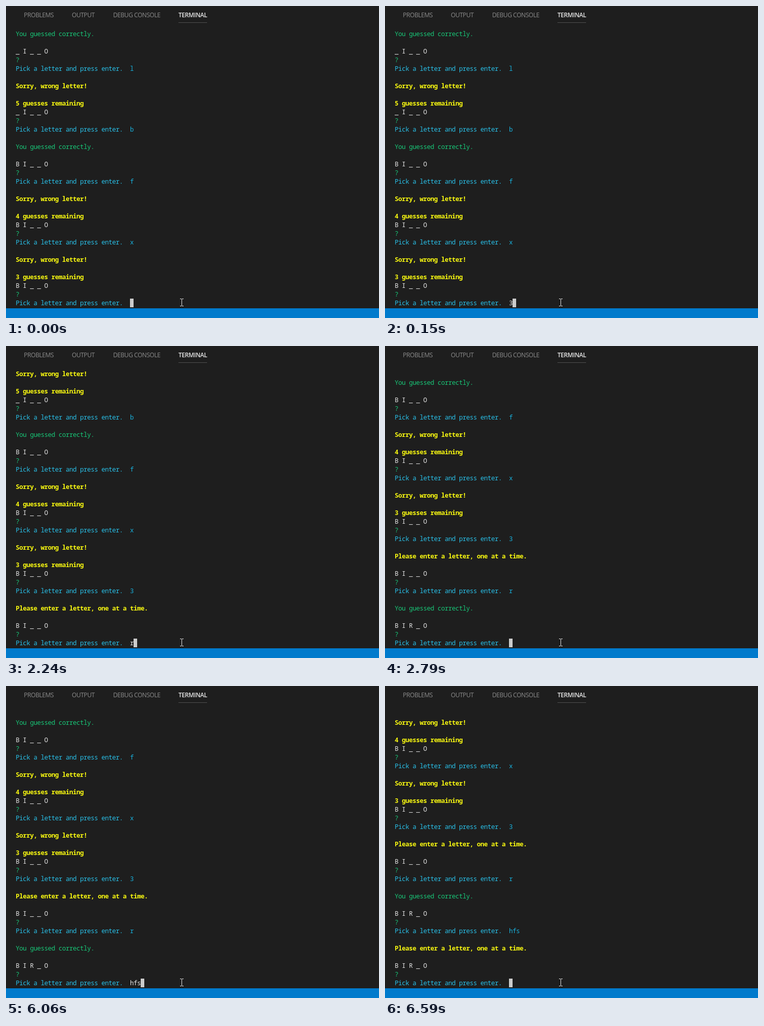
Animation of 731x611 px, one loop 8 s. Source, as an HTML page with a canvas:

```html
<!DOCTYPE html>
<html lang="en">
<head>
<meta charset="utf-8">
<title>Word game in a terminal</title>
<style>
  html, body { margin: 0; width: 100%; height: 100%; overflow: hidden; background: #1e1e1e; }
  canvas { display: block; }
</style>
</head>
<body>
<canvas id="stage" width="731" height="611"></canvas>
<script>
const ctx = document.getElementById('stage').getContext('2d');
const LOOP = 8000, ROWS = 32, ROW_H = 17, CELL = 7, LEFT = 19, TOP = 46;
const MONO = '12.5px "Noto Sans Mono", "DejaVu Sans Mono", monospace';
const SANS = '12px "Open Sans", "Noto Sans", sans-serif';
const GREEN = '#18c878', YELLOW = '#f8f810', CYAN = '#29c0e8', ANSWER = '#18b0dc', WHITE = '#e5e5e5';
const PROMPT = 'Pick a letter and press enter.  ';

// Each round: the message above the word, the word, and the answer given.
const right = 'You guessed correctly.';
const invalid = 'Please enter a letter, one at a time.';
const rounds = [
  [right, '_ I _ _ O', 'l'],
  [5, '_ I _ _ O', 'b'],
  [right, 'B I _ _ O', 'f'],
  [4, 'B I _ _ O', 'x'],
  [3, 'B I _ _ O', '3'],
  [invalid, 'B I _ _ O', 'r'],
  [right, 'B I R _ O', 'hfs'],
  [invalid, 'B I R _ O', '']
];

const FIRST_OPEN = 4;
const enterTimes = [530, 2790, 6590];
const keyTimes = [[150], [2240], [4350, 4920, 6060], []];

function stateAt(t) {
  const done = enterTimes.filter(e => t >= e).length;
  const typed = keyTimes[done].filter(k => t >= k).length;
  return { open: FIRST_OPEN + done, typed };
}

function transcript(open, typed) {
  const lines = [];
  const add = (text, color, answer = '', answerColor = ANSWER) =>
    lines.push({ text, color, answer, answerColor });
  rounds.slice(0, open + 1).forEach(([message, word, answer], i) => {
    if (i) add('');
    if (typeof message === 'number') {
      add('Sorry, wrong letter!', YELLOW);
      add('');
      add(message + ' guesses remaining', YELLOW);
    } else {
      add(message, message === right ? GREEN : YELLOW);
      add('');
    }
    add(word, WHITE);
    add('?', GREEN);
    if (i < open) add(PROMPT, CYAN, answer);
    else add(PROMPT, CYAN, answer.slice(0, typed), WHITE);
  });
  return lines.slice(-ROWS);
}

function rect(color, x, y, w, h) {
  ctx.fillStyle = color;
  ctx.fillRect(x, y, w, h);
}

function label(text, x, y, color) {
  ctx.fillStyle = color;
  ctx.fillText(text, x, y);
}

function drawTabs() {
  ctx.font = '500 ' + SANS;
  ctx.letterSpacing = '-0.45px';
  label('PROBLEMS', 35, 22, '#8c8c8c');
  label('OUTPUT', 129, 22, '#8c8c8c');
  label('DEBUG CONSOLE', 210, 22, '#8c8c8c');
  ctx.font = '600 ' + SANS;
  label('TERMINAL', 338, 22, '#e7e7e7');
  rect('#505050', 338, 32, 56, 1);
}

function drawTerminal(open, typed) {
  ctx.letterSpacing = '-0.5px'; // 7.5px glyphs on a 7px grid
  transcript(open, typed).forEach((line, row) => {
    const y = TOP + row * ROW_H + 13;
    ctx.font = (line.color === YELLOW ? '600 ' : '500 ') + MONO;
    label(line.text, LEFT, y, line.color);
    label(line.answer, LEFT + PROMPT.length * CELL, y, line.answerColor);
  });
  rect('#cccccc', LEFT + (PROMPT.length + typed) * CELL, TOP + (ROWS - 1) * ROW_H, CELL, ROW_H);
}

function drawPointer() {
  rect('#e8e8e8', 344, 574, 1, 13);
  for (const y of [573, 587]) {
    rect('#e8e8e8', 341, y, 3, 1);
    rect('#e8e8e8', 345, y, 3, 1);
  }
}

function draw(t) {
  const { open, typed } = stateAt(t);
  rect('#1e1e1e', 0, 0, 731, 611);
  drawTabs();
  drawTerminal(open, typed);
  rect('#007acc', 0, 592, 731, 19);
  drawPointer();
}

const start = performance.now();
function frame(now) {
  draw(Math.max(0, now - start) % LOOP);
  requestAnimationFrame(frame);
}
draw(0);
requestAnimationFrame(frame);
</script>
</body>
</html>
```
